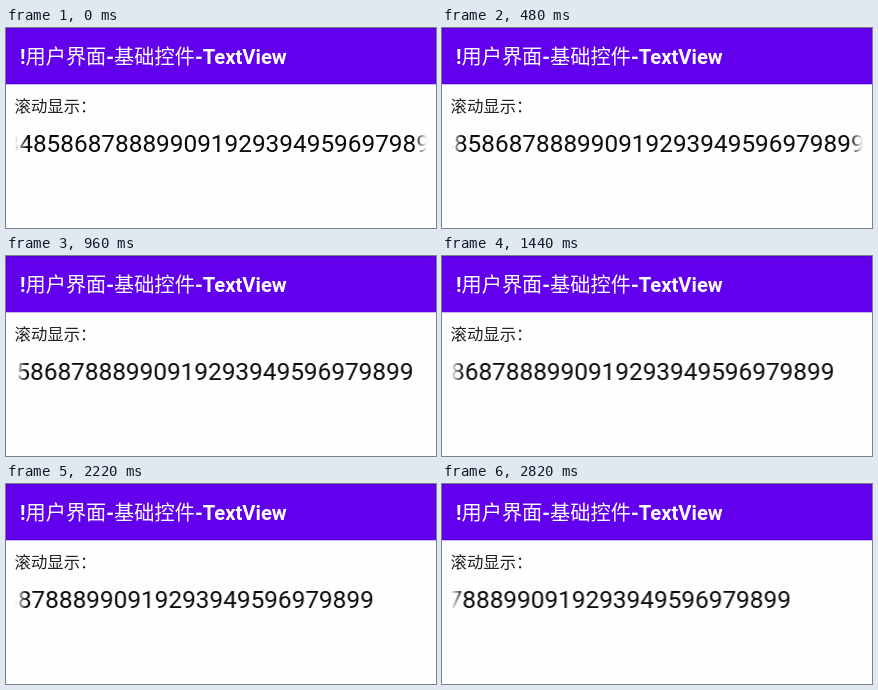
Recreate the animation shown at these times as an HTML page. Size 430x200 px, loop 2.84 s.

```html
<!DOCTYPE html>
<html lang="zh-CN">
<head>
<meta charset="utf-8">
<title>TextView</title>
<style>
  html, body { margin: 0; width: 100%; height: 100%; overflow: hidden; background: #fefefe; }
  svg { position: absolute; left: 0; top: 0; width: 430px; height: 200px; }
  text { font-family: Roboto, "Noto Sans CJK SC", "Noto Sans CJK", sans-serif; white-space: pre; }
  .title { font-size: 20.2px; font-weight: 700; fill: #fff; }
  .title tspan { font-weight: 400; }
  .label { font-size: 16.4px; fill: #222; }
  .digits { font-size: 24.36px; text-anchor: end; fill: #0a0a0a; animation: marquee 2840ms infinite; }
  .window {
    mask-image: linear-gradient(90deg, transparent 9px, #000 21px, #000 408px, transparent 421px);
  }
  /* 31.45 px per second, held between refreshes */
  @keyframes marquee {
    0%       { transform: translateX(0); animation-timing-function: steps(14); }
    59.1549% { transform: translateX(-52.84px); animation-timing-function: step-end; }
    64.7887% { transform: translateX(-57.87px); animation-timing-function: steps(2); }
    73.2394% { transform: translateX(-65.42px); animation-timing-function: step-end; }
    78.1690% { transform: translateX(-69.82px); animation-timing-function: steps(5); }
    99.2958%, 100% { transform: translateX(-88.69px); animation-timing-function: step-end; }
  }
</style>
</head>
<body>
<svg viewBox="0 0 430 200">
  <rect width="430" height="56.3" fill="#6200ee"/>
  <rect width="430" height="1" fill="#4c00cc"/>
  <text class="title" x="14" y="36">!<tspan>用户界面</tspan>-<tspan>基础控件</tspan>-TextView</text>
  <text class="label" x="8.5" y="83.8">滚动显示：</text>
</svg>
<svg class="window" viewBox="0 0 430 200">
  <text class="digits" x="437.6" y="123.8"></text>
</svg>
<script>
  const numbers = Array.from({ length: 20 }, (_, i) => 80 + i);
  document.querySelector(".digits").textContent = numbers.join("");
</script>
</body>
</html>
```
